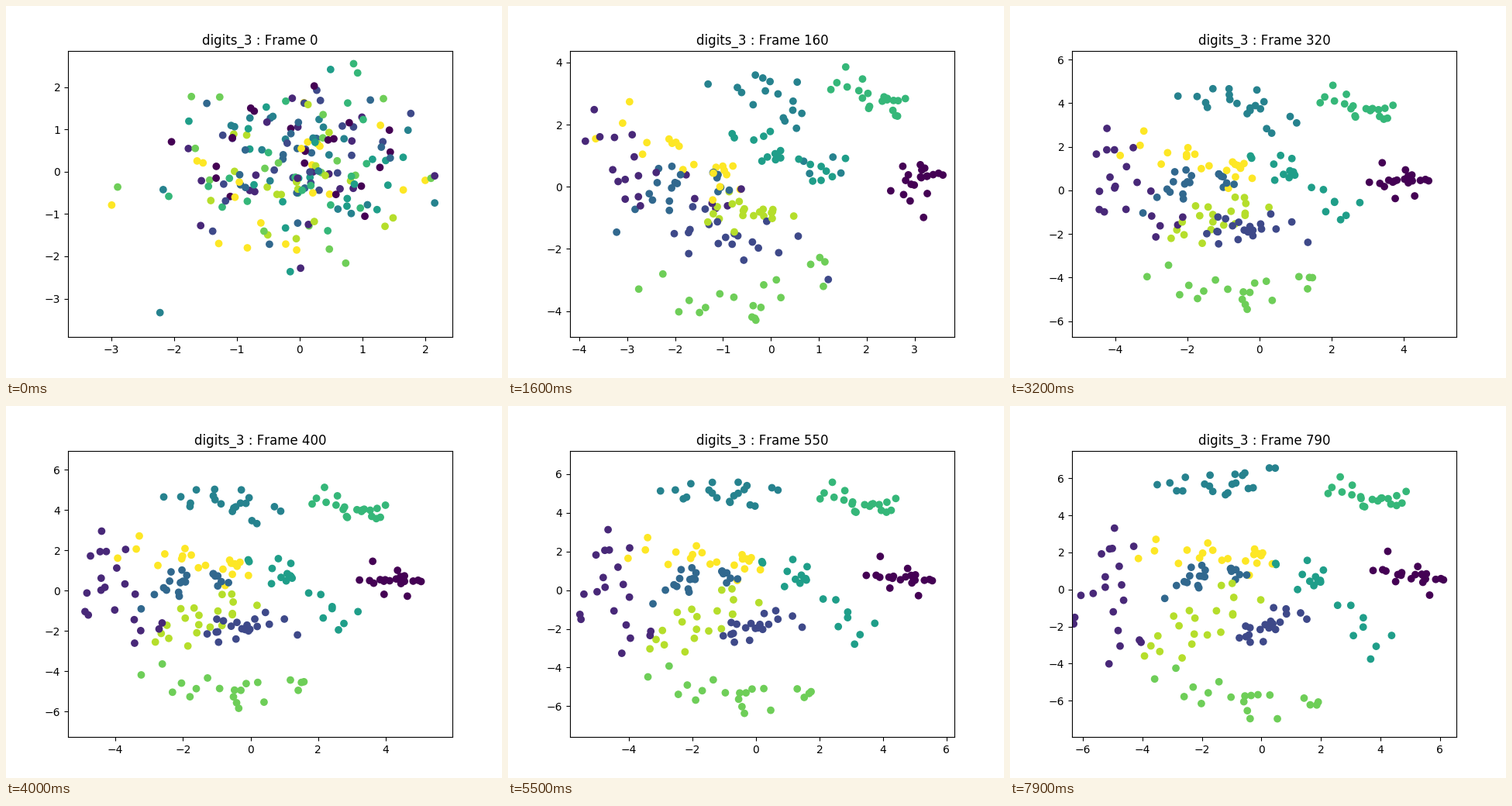
Recreate the animation shown at these times as a matplotlib script. Size 640x480 px, loop 8000 ms.

```python
import numpy as np
import matplotlib.pyplot as plt
from matplotlib.animation import FuncAnimation

FRAMES, INTERVAL = 80, 100
FORMED = 16          # frame at which the random cloud has split into classes
PER_CLASS = 20

plt.rcParams["text.kerning_factor"] = 6
rng = np.random.default_rng(3)

# One row per digit: arc (start, middle, end) when formed, and at the end.
ARCS = [
    ([(2.8, -.5), (3.1, .4), (3.45, .1)], [(3.9, 1.2), (5.2, .8), (5.95, .2)]),
    ([(-3.8, 2.2), (-2.6, .2), (-1, 0)], [(-5.1, 2.9), (-5.1, -.2), (-4.9, -3)]),
    ([(-2, -1), (-.9, -1.7), (.8, -2.5)], [(-.9, -2.3), (.3, -2.2), (1.2, -1.2)]),
    ([(-2.9, -1.2), (-2.1, .4), (-.6, 0)], [(-2.9, -.2), (-2.1, 1), (-.2, .9)]),
    ([(-.7, 2.8), (.1, 2.6), (1.4, .2)], [(-3.2, 5.5), (-1.4, 5.3), (.4, 6.3)]),
    ([(-.5, 1.7), (.4, .9), (1.5, .7)], [(1.2, .9), (2.3, .2), (4.3, -3.4)]),
    ([(1.4, 3.5), (2, 2.8), (2.7, 2.3)], [(2.4, 5.7), (3.4, 4.8), (4.8, 4.7)]),
    ([(-2.2, -3.3), (-.5, -3.8), (1.2, -2.4)], [(-2.8, -4.9), (-.7, -5.9), (2.1, -6.4)]),
    ([(-1.1, -.8), (-.5, -.8), (.1, -.9)], [(-3.5, -2.9), (-2.1, -2.1), (-.8, .2)]),
    ([(-3, 2.3), (-1.7, .7), (-.7, .1)], [(-3.6, 2.2), (-1.2, 1.7), (.3, 1.6)]),
]

# View limits at a few frames: left, right, bottom, top
VIEW_AT = [0, 16, 24, 40, 79]
VIEWS = np.array([
    (-3.691, 2.432, -3.910, 2.859),
    (-4.194, 3.833, -4.841, 4.384),
    (-4.943, 4.806, -6.054, 5.717),
    (-5.399, 5.972, -7.266, 6.958),
    (-6.365, 6.560, -7.975, 7.502),
])


def clock(i):
    """Steady until the classes are formed, then slowing logarithmically."""
    return i / FORMED if i < FORMED else 1 + np.log(i / FORMED)


def along(arc, noise):
    """Dots spread evenly on a quadratic arc, with noise that grows with it."""
    a, m, b = np.array(arc)
    t = np.linspace(0, 1, len(noise))[:, None]
    curve = a * (1 - t) * (1 - 2 * t) + 4 * m * t * (1 - t) + b * t * (2 * t - 1)
    return curve + noise * (0.12 + 0.08 * np.hypot(*(b - a)))


labels = np.repeat(np.arange(len(ARCS)), PER_CLASS)
noise = rng.normal(size=(len(ARCS), PER_CLASS, 2))
formed = np.concatenate([along(arc, n) for (arc, _), n in zip(ARCS, noise)])
settled = np.concatenate([along(arc, n) for (_, arc), n in zip(ARCS, noise)])
cloud = np.clip(rng.normal(size=formed.shape), (-3.4, -3.6), (2.15, 2.55))

# Mix the classes so that no colour always lies on top.
order = rng.permutation(len(labels))
labels, cloud, formed, settled = (v[order] for v in (labels, cloud, formed, settled))

VIEW_CLOCK = [clock(i) for i in VIEW_AT]
END = clock(FRAMES - 1)


def positions(now):
    if now < 1:
        return cloud + (formed - cloud) * np.sin(np.pi / 2 * now)
    return formed + (settled - formed) * (now - 1) / (END - 1)


fig, ax = plt.subplots(figsize=(6.4, 4.8), dpi=100)
dots = ax.scatter(*cloud.T, c=labels, cmap="viridis")
title = ax.set_title("")


def draw(i):
    now = clock(i)
    dots.set_offsets(positions(now))
    left, right, bottom, top = (np.interp(now, VIEW_CLOCK, v) for v in VIEWS.T)
    ax.set_xlim(left, right)
    ax.set_ylim(bottom, top)
    title.set_text(f"digits_3 : Frame {10 * i}")
    return dots, title


anim = FuncAnimation(fig, draw, frames=FRAMES, interval=INTERVAL,
                     repeat=True, repeat_delay=0, blit=False)
plt.show()
```
